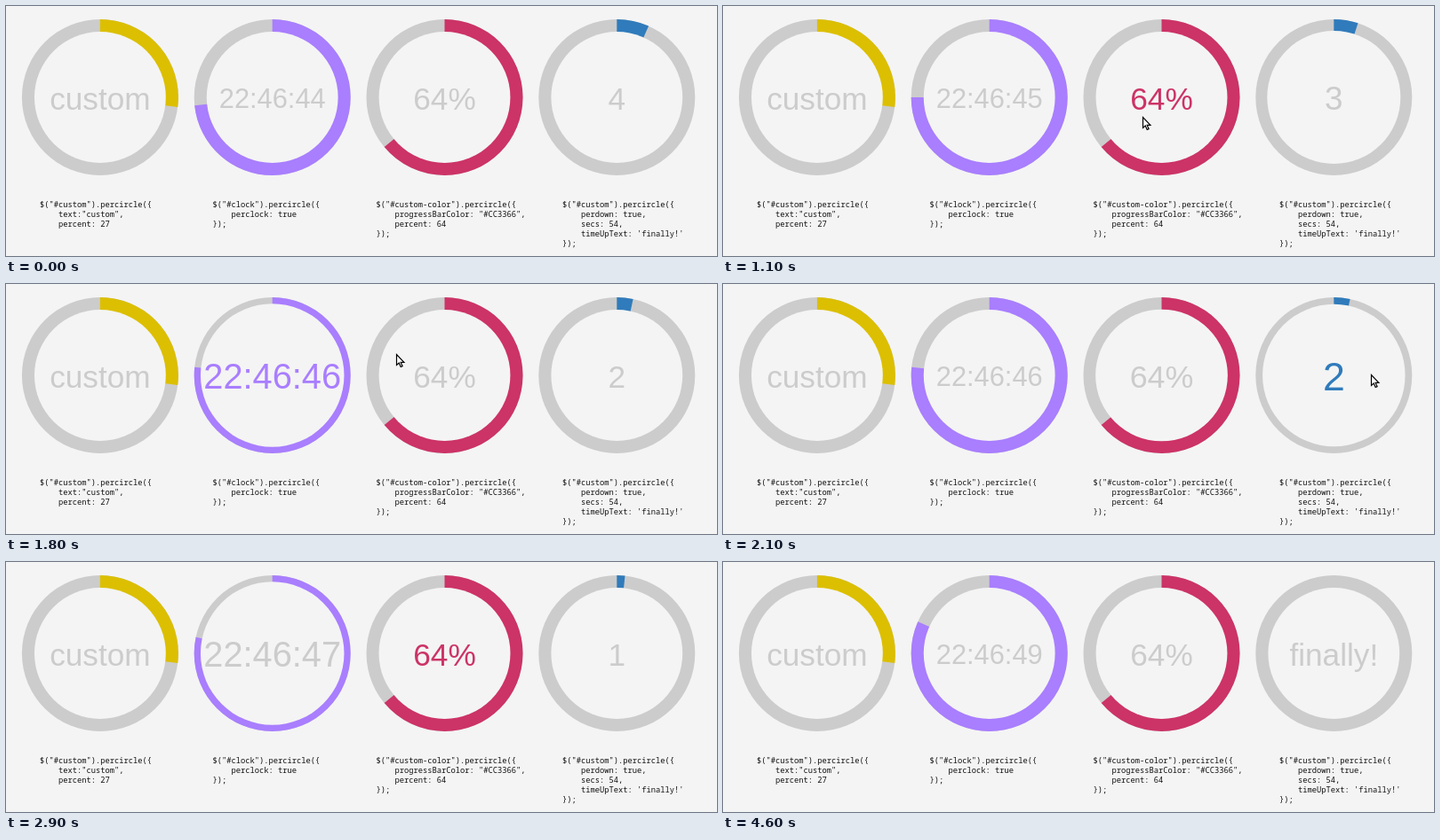
Recreate the animation shown at these times as an HTML page with a canvas. Size 800 px wide and 282 px high, loop 4.7 s.

```html
<!DOCTYPE html>
<html lang="en">
<head>
<meta charset="utf-8">
<title>Percircle demo</title>
<style>
  html, body { margin: 0; width: 100%; height: 100%; overflow: hidden; background: #f4f4f4; }
  canvas { display: block; width: 800px; height: 282px; }
</style>
</head>
<body>
<canvas id="stage" width="800" height="282"></canvas>
<script>
const ctx = document.getElementById('stage').getContext('2d');
const LOOP = 4700, STEP = 100;
const FADE = 200, LAG = 60; // hover transition and pointer delay, ms
const BG = '#f4f4f4', GREY = '#ccc';
const CY = 103, R = 88;

const rings = [
  { color: '#dcbf00', size: 35.2, codeX: 38,
    state: () => ['custom', 0.27],
    code: ['$("#custom").percircle({', '    text:"custom",', '    percent: 27'] },
  { color: '#a97eff', size: 30.8, codeX: 232.5,
    state: n => ['22:46:' + (44 + n), (44 + n) / 60],
    code: ['$("#clock").percircle({', '    perclock: true', '});'] },
  { color: '#cc3366', size: 35.2, codeX: 416.5,
    state: () => ['64%', 0.64],
    code: ['$("#custom-color").percircle({', '    progressBarColor: "#CC3366",', '    percent: 64', '});'] },
  { color: '#307bbb', size: 35.2, codeX: 626,
    state: n => n < 4 ? [String(4 - n), (4 - n) / 60] : ['finally!', 0],
    code: ['$("#custom").percircle({', '    perdown: true,', '    secs: 54,', "    timeUpText: 'finally!'", '});'] }
];
rings.forEach((ring, i) => { ring.x = 105.9 + 193.8 * i; });

// turning points of the pointer: [time, x, y]
const path = [
  [100, 40, 190], [600, 720, 110], [900, 595, 120], [1030, 580, 123],
  [1100, 472, 125], [1200, 79, 219], [1560, 215, 85], [1800, 439, 79],
  [1950, 729, 102], [2100, 729, 102], [2200, 640, 185], [2780, 300, 110],
  [2850, 440, 105], [3350, 440, 105], [3550, 657, 158], [3800, 657, 158],
  [4000, 645, 282]
];
const isHidden = t => t > 2850 && t < 3350;

const ease = u => u * u * (3 - 2 * u);

function pointerAt(t) {
  const i = path.findIndex(p => p[0] > t);
  if (i < 1) return null;
  const [t0, x0, y0] = path[i - 1], [t1, x1, y1] = path[i];
  const u = (t - t0) / (t1 - t0);
  return { x: x0 + (x1 - x0) * u, y: y0 + (y1 - y0) * u };
}

function isOver(ring, t) {
  const p = pointerAt(t - LAG);
  return p !== null && Math.hypot(p.x - ring.x, p.y - CY) < R;
}

// share of the last FADE ms spent over the ring, eased
function growth(ring, t) {
  const n = 20;
  let hits = 0;
  for (let i = 0; i < n; i++) {
    if (isOver(ring, t - (i + 0.5) * FADE / n)) hits++;
  }
  return ease(hits / n);
}

function disc(x, r, color, part = 1) {
  const start = -Math.PI / 2;
  ctx.fillStyle = color;
  ctx.beginPath();
  if (part < 1) ctx.moveTo(x, CY);
  ctx.arc(x, CY, r, start, start + part * 2 * Math.PI);
  ctx.fill();
}

function drawRing(ring, t, ticks) {
  const grow = growth(ring, t);
  const [label, part] = ring.state(ticks);
  disc(ring.x, R, GREY);
  if (part) disc(ring.x, R, ring.color, part);
  disc(ring.x, R * (0.84 + 0.08 * grow), BG);

  const size = ring.size * (1 + 0.3 * grow);
  ctx.font = size + 'px "Liberation Sans", Arial, sans-serif';
  ctx.textAlign = 'center';
  ctx.fillStyle = isOver(ring, t) ? ring.color : GREY;
  ctx.fillText(label, ring.x, CY + 1.5 + size * 0.3465);
}

function drawCode({ code, codeX }) {
  ctx.font = '8.75px "Noto Sans Mono", "DejaVu Sans Mono", monospace';
  ctx.textAlign = 'left';
  ctx.fillStyle = '#111';
  code.forEach((line, i) => ctx.fillText(line, codeX, 226.5 + i * 11));
}

const arrow = new Path2D('M.5 .5v12l2.7-2.4 2 4.4 1.9-.8-1.9-4.3h3.7z');

function drawPointer({ x, y }) {
  ctx.save();
  ctx.translate(x, y);
  ctx.fillStyle = '#fff';
  ctx.fill(arrow);
  ctx.strokeStyle = '#000';
  ctx.lineWidth = 1.2;
  ctx.stroke(arrow);
  ctx.restore();
}

function draw(t) {
  ctx.fillStyle = BG;
  ctx.fillRect(0, 0, 800, 282);
  const ticks = Math.floor((t + 500) / 1000);
  for (const ring of rings) {
    drawRing(ring, t, ticks);
    drawCode(ring);
  }
  const p = pointerAt(t);
  if (p && !isHidden(t)) drawPointer(p);
}

function frame() {
  const t = performance.now() % LOOP;
  draw(Math.floor(t / STEP) * STEP);
  requestAnimationFrame(frame);
}
frame();
</script>
</body>
</html>
```
